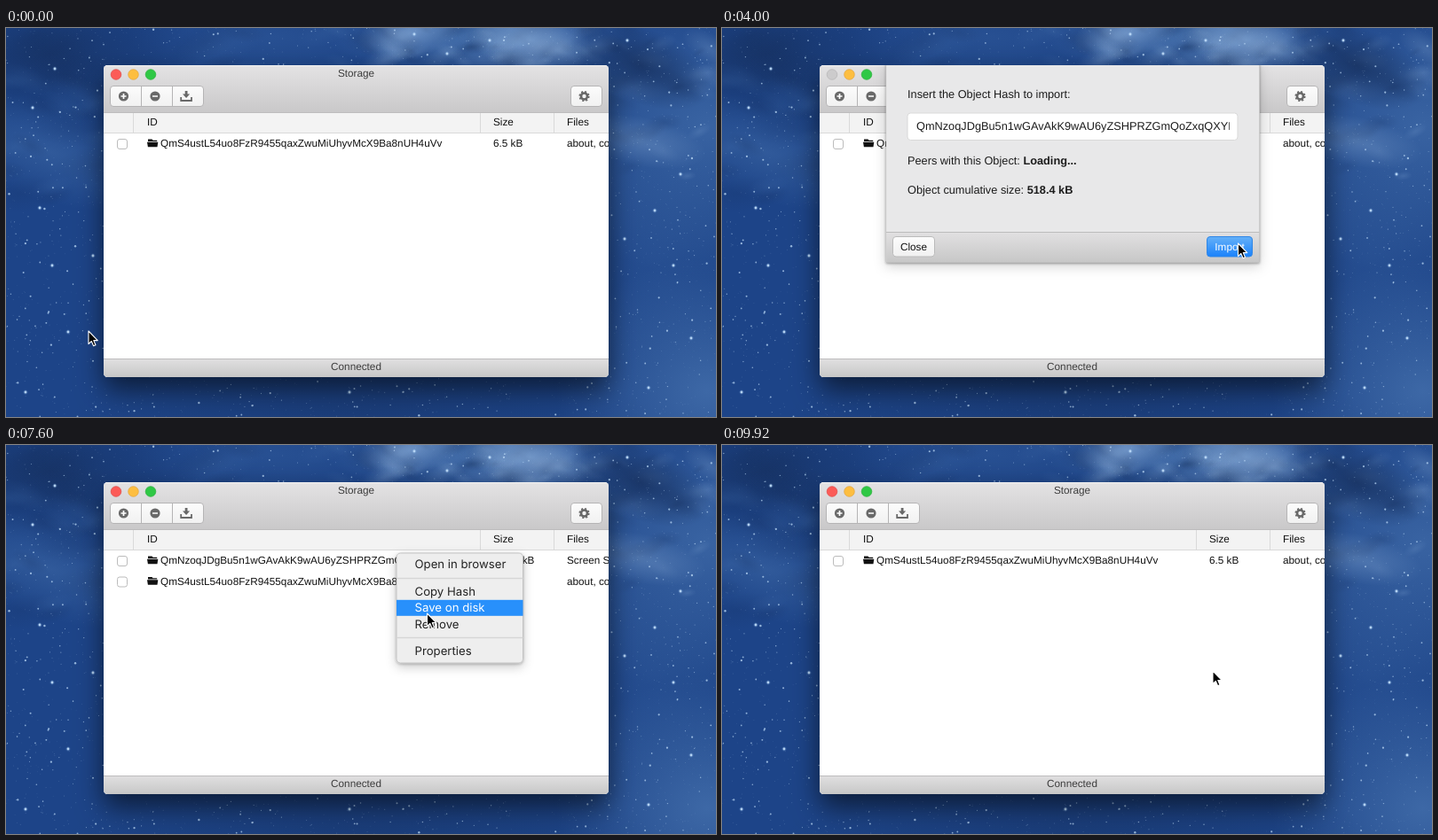
These frames come from a looping animation (800x439 px, 10 s). An HTML page with a canvas:

```html
<!DOCTYPE html>
<html lang="en">
<head>
<meta charset="utf-8">
<title>Storage</title>
<style>
html, body { margin: 0; width: 100%; height: 100%; overflow: hidden; background: #1d4488; }
#sky, #ui { position: absolute; left: 0; top: 0; width: 800px; height: 439px; }
text { font-family: "Liberation Sans", Arial, sans-serif; font-size: 11.75px; fill: #111; white-space: pre; text-rendering: geometricPrecision; }
.big text { font-size: 12.75px; fill: #1c1c1c; }
.menu text { font-family: Inter, sans-serif; font-size: 13.2px; fill: #222; }
.soft { fill: #3c3c3c; }
.b { font-weight: bold; }
.mid { text-anchor: middle; }
</style>
</head>
<body>
<canvas id="sky" width="800" height="439"></canvas>
<svg id="ui" viewBox="0 0 800 439">
  <defs>
    <linearGradient id="head" x2="0" y2="1"><stop stop-color="#e4e3e4"/><stop offset="1" stop-color="#c9c8c9"/></linearGradient>
    <linearGradient id="foot" x2="0" y2="1"><stop stop-color="#e1e0e1"/><stop offset="1" stop-color="#c7c7c7"/></linearGradient>
    <linearGradient id="btn" x2="0" y2="1"><stop stop-color="#fcfcfc"/><stop offset="1" stop-color="#f1f1f1"/></linearGradient>
    <linearGradient id="blue" x2="0" y2="1"><stop stop-color="#66b1f8"/><stop offset="1" stop-color="#1a82fb"/></linearGradient>
    <linearGradient id="down" x2="0" y2="1"><stop stop-color="#2b8df4"/><stop offset="1" stop-color="#0467dd"/></linearGradient>
    <filter id="winShade" x="-20%" y="-20%" width="140%" height="150%"><feDropShadow dx="0" dy="14" stdDeviation="15" flood-opacity=".58"/></filter>
    <filter id="sheetShade" x="-10%" y="-10%" width="120%" height="125%">
      <feDropShadow dx="0" dy="1" stdDeviation="1.4" flood-opacity=".38"/>
      <feDropShadow dx="0" dy="4" stdDeviation="7" flood-opacity=".17"/>
    </filter>
    <filter id="menuShade" x="-20%" y="-20%" width="140%" height="140%">
      <feDropShadow dx="0" dy="1" stdDeviation="1.4" flood-opacity=".25"/>
      <feDropShadow dx="0" dy="4" stdDeviation="6" flood-opacity=".2"/>
    </filter>
    <clipPath id="win"><rect x="110" y="42" width="569" height="352" rx="4.5"/></clipPath>
    <clipPath id="below"><rect y="42" width="800" height="397"/></clipPath>
    <clipPath id="field"><rect x="211" y="97" width="361" height="29"/></clipPath>
  </defs>

  <rect x="110" y="42" width="569" height="352" rx="4.5" fill="#fff" filter="url(#winShade)"/>
  <g clip-path="url(#win)">
    <rect x="110" y="42" width="569" height="53.5" fill="url(#head)"/>
    <path d="M110 42.5H679" stroke="#f3f3f3"/>
    <path d="M110 95.5H679" stroke="#bdbcbd"/>
    <rect x="110" y="96" width="569" height="22.5" fill="#f3f3f3"/>
    <path d="M110 118.5H679M143.5 96V118M534.5 96V118M617.5 96V118" stroke="#d9d9d9"/>
    <text x="159" y="110">ID</text><text x="549" y="110">Size</text><text x="632" y="110">Files</text>
    <text class="mid soft" x="394.5" y="55.3">Storage</text>
    <circle id="red" cx="124" cy="52.5" r="5.8" stroke-width=".7"/>
    <circle cx="143.5" cy="52.5" r="5.8" fill="#fdbe40" stroke="#e2a23a" stroke-width=".7"/>
    <circle cx="163" cy="52.5" r="5.8" fill="#2fc845" stroke="#28ae38" stroke-width=".7"/>

    <g fill="url(#btn)" stroke="#b5b4b5">
      <rect x="117.5" y="65.5" width="105" height="23" rx="3.5"/>
      <rect x="636.5" y="65.5" width="35" height="23" rx="3.5"/>
      <path d="M152.5 66V88M187.5 66V88"/>
    </g>
    <g fill="#696969">
      <circle cx="132.5" cy="77" r="5.6"/><circle cx="168" cy="77" r="5.6"/>
      <path d="M129.5 77h6M132.5 74v6M165 77h6" stroke="#fff" stroke-width="1.7"/>
      <path d="M201.7 71h2.8v3.6h2.7L203.1 79 199 74.6h2.7z"/>
      <path d="M197.2 78v4H209V78" fill="none" stroke="#696969" stroke-width="1.8"/>
      <circle cx="651.5" cy="77" r="3.5" fill="none" stroke="#696969" stroke-width="2.6"/>
      <circle cx="651.5" cy="77" r="5.2" fill="none" stroke="#696969" stroke-width="1.8" stroke-dasharray="2.05 2.034"/>
    </g>
    <g id="rows"></g>

    <rect x="110" y="373" width="569" height="21" fill="url(#foot)"/>
    <path d="M110 373.5H679" stroke="#bdbcbd"/>
    <text class="mid soft" x="394.5" y="386">Connected</text>
  </g>

  <g clip-path="url(#below)">
    <g id="sheet">
      <rect x="185" y="38" width="420.5" height="226.5" fill="#eaeaea" stroke="#aaa" stroke-width=".6" filter="url(#sheetShade)"/>
      <g id="spin" stroke-width="5" stroke-linecap="round"></g>
      <g id="form">
        <rect x="185.3" y="38" width="420" height="193" fill="#e8e8e9"/>
        <g class="big">
          <text x="209" y="79">Insert the Object Hash to import:</text>
          <rect x="209" y="96" width="372" height="30.5" rx="3.5" fill="#fff" stroke="#d9d9d9"/>
          <g clip-path="url(#field)"><text id="hash" x="219" y="115"></text></g>
          <g id="info">
            <text x="209" y="154">Peers with this Object: <tspan class="b">Loading...</tspan></text>
            <text x="209" y="187">Object cumulative size: <tspan class="b" id="size"></tspan></text>
          </g>
        </g>
        <rect x="185.3" y="231" width="420" height="33.3" fill="url(#foot)"/>
        <path d="M185 230.5H605.5" stroke="#bcbcbc"/>
        <rect x="192.5" y="235.5" width="47" height="22.5" rx="3.5" fill="url(#btn)" stroke="#bbb"/>
        <text class="mid" x="216" y="251">Close</text>
        <rect id="ok" x="546.5" y="235.5" width="51" height="22.5" rx="3.5"/>
        <text class="mid" x="572" y="251" style="fill:#fff">Import</text>
      </g>
    </g>
  </g>

  <g id="menu" class="menu">
    <rect x="440" y="122" width="142.5" height="124" rx="4.5" fill="#eeeeee" stroke="#b4b4b4" stroke-width=".7" filter="url(#menuShade)"/>
    <path d="M440 150.5H582.5M440 217.5H582.5" stroke="#d6d6d6" stroke-width="1.6"/>
    <rect id="bar" x="440" width="142.5" height="18" fill="#2890fb"/>
    <g id="items"></g>
  </g>

  <path id="mouse" d="M0 0V14.6L3.3 11.5 5.6 16.7 8 15.7 5.8 10.6H10.3Z" fill="#000" stroke="#fff" stroke-width="1.1" stroke-linejoin="round"/>
</svg>
<script>
const $ = id => document.getElementById(id);
const LOOP = 10000, STEP = 80;
const NEW = "QmNzoqJDgBu5n1wGAvAkK9wAU6yZSHPRZGmQoZxqQXYBb6";
const OLD = "QmS4ustL54uo8FzR9455qaxZwuMiUhyvMcX9Ba8nUH4uVv";

function seeded(s) {
  return () => {
    s = (s + 0x6D2B79F5) | 0;
    let r = Math.imul(s ^ (s >>> 15), 1 | s);
    r = (r + Math.imul(r ^ (r >>> 7), 61 | r)) ^ r;
    return ((r ^ (r >>> 14)) >>> 0) / 4294967296;
  };
}

function paintSky() {
  const c = $("sky").getContext("2d"), rnd = seeded(11);
  c.fillStyle = "#1d4488";
  c.fillRect(0, 0, 800, 439);
  const blob = (x, y, rx, ry, rgb, a, turn = 0) => {
    c.save();
    c.translate(x, y);
    c.rotate(turn);
    c.scale(rx, ry);
    const g = c.createRadialGradient(0, 0, 0, 0, 0, 1);
    g.addColorStop(0, `rgba(${rgb},${a})`);
    g.addColorStop(.5, `rgba(${rgb},${a * .5})`);
    g.addColorStop(1, `rgba(${rgb},0)`);
    c.fillStyle = g;
    c.fillRect(-1, -1, 2, 2);
    c.restore();
  };
  const dark = "20,44,88", pale = "140,175,218", mid = "72,116,176";
  blob(50, 30, 170, 80, dark, .6);
  blob(50, 140, 150, 55, mid, .45, .3);
  blob(300, 10, 160, 50, mid, .25);
  blob(790, 110, 210, 170, mid, .65);
  blob(790, 410, 170, 150, mid, .75);
  blob(730, 260, 120, 120, mid, .2);
  blob(530, 5, 170, 55, mid, .9);
  blob(400, 440, 330, 70, dark, .35);
  // wisps
  for (let i = 0; i < 110; i++) {
    const x = 400 + rnd() * 400, y = rnd() * (x > 680 ? 170 : 42), r = 6 + rnd() * 20;
    blob(x, y, r * 1.5, r * .7, rnd() < .55 ? pale : dark, .1 + rnd() * .16, rnd() * 1.2 - .6);
  }
  for (let i = 0; i < 60; i++) {
    const r = 10 + rnd() * 24;
    blob(rnd() * 380, rnd() * 190, r * 1.6, r * .7, rnd() < .5 ? mid : dark, .17, rnd() - .5);
  }
  blob(590, 14, 70, 38, pale, .7, .2);
  blob(455, 6, 60, 28, pale, .6, -.2);
  blob(715, 128, 75, 28, pale, .35, .2);
  blob(715, 42, 85, 42, dark, .75, .4);

  const star = (x, y, r, a) => {
    c.fillStyle = `rgba(185,215,245,${a})`;
    c.beginPath();
    c.arc(x, y, r, 0, 7);
    c.fill();
  };
  for (let i = 0; i < 3800; i++) {
    const k = rnd();
    star(rnd() * 800, rnd() * 439, .45 + k ** 8 * .75, .16 + k ** 2 * .62);
  }
  const bright = [55,46, 52,268, 70,343, 22,411, 30,90, 98,257, 731,206, 724,406, 752,268,
    697,238, 545,14, 497,29, 460,7, 700,14, 772,350, 387,411, 38,203, 760,165];
  for (let i = 0; i < bright.length; i += 2) {
    blob(bright[i], bright[i + 1], 3, 3, "160,205,250", .5);
    star(bright[i], bright[i + 1], 1.4, .95);
  }
}

function row(y, id, size, files, on) {
  const ink = on ? "#fff" : "#111";
  const txt = (x, s) => `<text x="${x}" y="${y + 15}" style="fill:${ink}"${on ? ' stroke="#fff" stroke-width=".3"' : ""}>${s}</text>`;
  return (on ? `<rect x="110" y="${y}" width="569" height="23.5" fill="#046cdf"/>` : "") +
    `<rect x="125.5" y="${y + 6.5}" width="11" height="11" rx="2.5" fill="#fff" stroke="#bcbcbc"/>` +
    `<path d="M160 ${y + 9}v-2.5h4.5l1 1.3h4.7v1.2zM159 ${y + 9.8}h12.3l-.8 5.4h-10.6z" fill="${ink}"/>` +
    txt(174, id) + txt(549, size) + txt(632, files);
}
const first = on => row(119, NEW, "518.4 kB", "Screen Shot", on);
const second = y => row(y, OLD, "6.5 kB", "about, contact", false);
const tables = [second(119), first(false) + second(142.5), first(true) + second(142.5)];

const items = [["Open in browser", 139], ["Copy Hash", 169.5], ["Save on disk", 188], ["Remove", 206.5], ["Properties", 237]];
$("items").innerHTML = items.map(([s, y]) => `<text x="460.5" y="${y}">${s}</text>`).join("");
$("spin").innerHTML = Array.from({ length: 12 }, (_, i) =>
  `<path d="M395 142V134.5" transform="rotate(${i * 30} 395 153.5)"/>`).join("");
const bars = [...$("spin").children], labels = [...$("items").children];

const path = [
  [0, 93, 342], [80, 93, 342], [480, 203, 78], [640, 203, 78], [1040, 375, 139],
  [1360, 400, 108], [3200, 400, 108], [3840, 581.5, 243], [4480, 581.5, 243],
  [4800, 582, 246], [5360, 582, 246], [6320, 440, 122], [6720, 440, 122],
  [7600, 474.5, 190], [7920, 477, 204], [8560, 477, 204], [9200, 553, 255], [LOOP, 553, 255]
];
const smooth = u => (u = Math.min(1, Math.max(0, u)), u * u * (3 - 2 * u));
const show = (id, on) => $(id).setAttribute("visibility", on ? "inherit" : "hidden");

function mouseAt(t) {
  const i = path.findIndex((p, k) => k && t <= p[0]);
  const [t0, x0, y0] = path[i - 1], [t1, x1, y1] = path[i];
  const u = smooth((t - t0) / (t1 - t0));
  return [x0 + (x1 - x0) * u, y0 + (y1 - y0) * u];
}

let table = -1;
function draw(t) {
  const [mx, my] = mouseAt(t);
  $("mouse").setAttribute("transform", `translate(${mx} ${my})`);

  const busy = (t >= 640 && t < 5280) || (t >= 8160 && t < 9360);
  $("red").setAttribute("fill", busy ? "#cccbcc" : "#fc5b57");
  $("red").setAttribute("stroke", busy ? "#b3b2b3" : "#df4744");

  const next = t < 5680 || t >= 9360 ? 0 : t < 8080 ? 1 : 2;
  if (next !== table) $("rows").innerHTML = tables[table = next];

  // sheet slides out of the title bar and back
  const out = smooth((t - 640) / 222) - smooth((t - 5040) / 222);
  show("sheet", out > 0);
  $("sheet").setAttribute("transform", `translate(0 ${(out - 1) * 222.5})`);
  const loaded = t >= 1440;
  show("spin", !loaded);
  show("form", loaded);
  const turn = 2 + Math.floor((t - 1040) / 80);
  bars.forEach((b, i) => {
    const age = (((turn - i) % 12) + 12) % 12;
    const v = age < 3 ? 0 : 20 + (age - 2) * 16;
    b.setAttribute("stroke", `rgb(${v},${v},${v})`);
  });
  $("hash").textContent = t >= 2000 ? NEW : "";
  show("info", loaded && t >= 2000);
  $("size").textContent = t >= 2800 ? "518.4 kB" : "Loading...";
  const pressed = t >= 4800;
  $("ok").setAttribute("fill", pressed ? "url(#down)" : "url(#blue)");
  $("ok").setAttribute("stroke", pressed ? "#0a66d4" : "#2f86e6");

  show("menu", t >= 6560 && t < 8080);
  const hit = items.findIndex(([, y]) => my >= y - 13.5 && my < y + 5);
  show("bar", hit >= 0);
  if (hit >= 0) $("bar").setAttribute("y", items[hit][1] - 13.2);
  labels.forEach((l, i) => { l.style.fill = i === hit ? "#fff" : "#222"; });
}

function frame() {
  draw(Math.floor((performance.now() % LOOP) / STEP) * STEP);
  requestAnimationFrame(frame);
}
paintSky();
frame();
</script>
</body>
</html>
```
